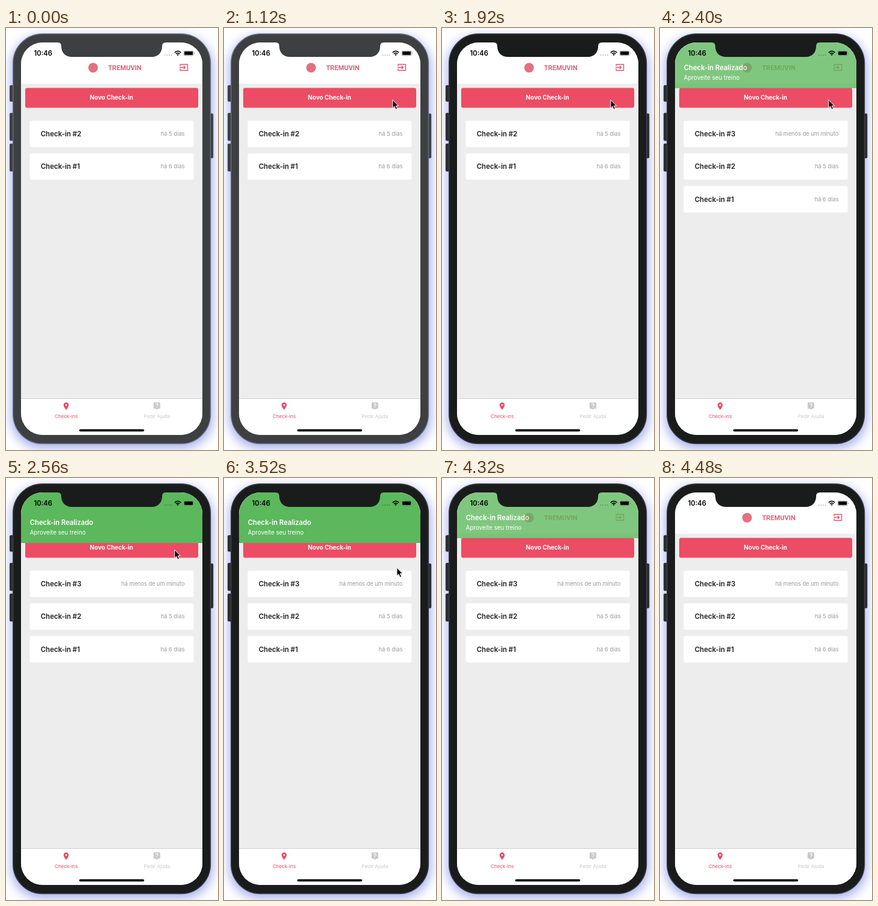
Recreate the animation shown at these times as an HTML page. Size 353 by 701 pixels, loop 5.12 s.

```html
<!DOCTYPE html>
<html lang="pt">
<head>
<meta charset="utf-8">
<title>Check-ins</title>
<style>
  html, body { margin: 0; width: 100%; height: 100%; overflow: hidden; background: #fff; }
  svg { display: block; width: 353px; height: 701px; font-family: Inter, "Open Sans", sans-serif; }
  .bold { font-weight: 700; }
  .semi { font-weight: 600; }
  .mid { text-anchor: middle; }
  .end { text-anchor: end; }
  .red { fill: #ec4c64; }
  .card rect { fill: #fff; }
  .card .bold { font-size: 11.4px; fill: #333; }
  .card .end { font-size: 9.3px; fill: #999; }
  .tab { font-size: 8.1px; text-anchor: middle; }
</style>
</head>
<body>
<svg viewBox="0 0 353 701">
  <defs>
    <filter id="blur" x="-20%" y="-10%" width="140%" height="120%"><feGaussianBlur stdDeviation="9"/></filter>
    <clipPath id="screen"><rect x="25" y="24" width="302" height="652" rx="36"/></clipPath>
  </defs>

  <rect x="9" y="14" width="335" height="684" rx="50" fill="#8c9ae6" opacity=".8" filter="url(#blur)"/>

  <g id="shell">
    <g id="buttons" stroke-width=".8">
      <rect x="6.4" y="95.4" width="8" height="26.5" rx="1.5"/>
      <rect x="6.4" y="141.4" width="8" height="45.5" rx="1.5"/>
      <rect x="6.4" y="192.4" width="8" height="45.5" rx="1.5"/>
      <rect x="337" y="142.4" width="7.8" height="73.5" rx="1.5"/>
    </g>
    <rect id="bezel" x="11.7" y="9.7" width="328.8" height="680.8" rx="49" stroke-width="1.4"/>
  </g>

  <g clip-path="url(#screen)">
    <rect x="25" y="24" width="302" height="652" fill="#ededed"/>
    <rect x="25" y="24" width="302" height="68.5" fill="#fff"/>
    <circle cx="145" cy="66" r="8" fill="#e4707f"/>
    <text x="170" y="70" class="bold" font-size="11.1" fill="#dc6275" style="font-family:Roboto,sans-serif">TREMUVIN</text>
    <g fill="none" stroke="#ec4c64" stroke-width="1.3">
      <path d="M290 63.5V60.5H302.5V70.5H290V67.5M289 65.5H298M295.8 63L298.3 65.5L295.8 68"/>
    </g>

    <rect x="32" y="99.5" width="288" height="33" rx="3" class="red"/>
    <text x="175.7" y="119.4" class="bold mid" font-size="10" fill="#fff">Novo Check-in</text>
    <g id="cards"></g>

    <rect x="25" y="615" width="302" height="61" fill="#fff"/>
    <rect x="25" y="615" width="302" height=".8" fill="#c4c4c4"/>
    <path class="red" fill-rule="evenodd" transform="translate(92.8 620.7) scale(.61)"
      d="M12 2C8.1 2 5 5.1 5 9c0 5.3 7 13 7 13s7-7.700 7-13c0-3.900-3.100-7-7-7zM12 6.500a2.500 2.500 0 0 1 0 5a2.500 2.500 0 0 1 0-5z"/>
    <path fill="#c8c8c8" d="M247.2 622H255.300Q256.700 622 256.700 623.400V631Q256.700 632.400 255.300 632.400H253L251.200 634.300L249.400 632.400H247.200Q245.800 632.400 245.800 631V623.400Q245.800 622 247.200 622Z"/>
    <path d="M249.300 625.800C249.300 623.200 253.200 623.200 253.200 625.700C253.200 627 251.300 627.200 251.300 628.800M251.300 629.800V631" fill="none" stroke="#fff" stroke-width="1.100"/>
    <text x="100.400" y="647.500" class="tab red">Check-ins</text>
    <text x="251.300" y="647.500" class="tab" fill="#c8c8c8">Pedir Ajuda</text>
    <rect x="122" y="666.500" width="108" height="3.700" rx="1.850"/>

    <g id="toast">
      <rect x="25" y="10" width="302" height="98" fill="#5cb85c"/>
      <text x="39.700" y="77.500" class="semi" font-size="11.300" fill="#fff">Check-in Realizado</text>
      <text x="39.700" y="94" font-size="9.800" fill="#fff">Aproveite seu treino</text>
    </g>

    <path id="notch" d="M86 23V24Q92 24 92 30C92 41 99 48 110 48H242C253 48 260 41 260 30Q260 24 266 24V23Z"/>
    <text x="46.500" y="46" class="semi" font-size="11.300">10:46</text>
    <g fill="#000" fill-opacity=".25">
      <circle cx="264.500" cy="45" r="1.100"/><circle cx="268.200" cy="45" r="1.100"/>
      <circle cx="271.900" cy="45" r="1.100"/><circle cx="275.600" cy="45" r="1.100"/>
    </g>
    <g fill="none" stroke="#000" stroke-width="1.600">
      <path d="M280.700 40.800Q286 36.100 291.300 40.800M282.700 43Q286 40.200 289.300 43"/>
      <path d="M284.200 44.200Q286 42.900 287.800 44.200L286 46Z" fill="#000" stroke="none"/>
    </g>
    <rect x="295.900" y="38" width="16.200" height="7.900" rx="2.200" fill="none" stroke="#777" stroke-width=".7"/>
    <rect x="297" y="39.100" width="14" height="5.700" rx="1.200"/>
    <path d="M313 40.500Q314.500 42 313 43.500Z" fill="#777"/>
  </g>

  <path id="cursor" d="M0 0V13.600L3 10.800L5.300 16L7.800 14.900L5.500 9.900H9.800Z" fill="#0b0b14" stroke="#fff" stroke-width="1" stroke-linejoin="round"/>
</svg>
<script>
  const LOOP = 5120;
  const el = id => document.getElementById(id);

  // Each entry holds from its start time until the next one.
  const cursorPath = [
    [0, null], [480, [312, 230]], [640, [300.5, 186.800]], [800, [284.500, 127.500]],
    [960, [282.500, 122.500]], [1120, [280.700, 119.300]], [3520, [287.800, 149]],
    [3680, [308.500, 247]], [3840, null]
  ];
  const toastStates = [
    [0, null], [2400, { y: -8, opacity: .78 }], [2560, { y: 0, opacity: 1 }],
    [4320, { y: -8, opacity: .78 }], [4480, null]
  ];
  const shellColors = [
    [0, { fill: '#3e3f40', edge: '#68708f', button: '#3b3d40' }],
    [1920, { fill: '#1a1c1c', edge: '#3c404c', button: '#2b2e32' }]
  ];
  const cardLists = [
    [0, [[2, 'há 5 dias'], [1, 'há 6 dias']]],
    [2400, [[3, 'há menos de um minuto'], [2, 'há 5 dias'], [1, 'há 6 dias']]]
  ];

  const valueAt = (track, time) => track.findLast(([start]) => start <= time)[1];

  const card = ([number, age], index) => `
    <g class="card" transform="translate(0 ${index * 54.300})">
      <rect x="39.500" y="154" width="273" height="43.800" rx="3"/>
      <text x="57.700" y="180" class="bold">Check-in #${number}</text>
      <text x="297.300" y="179" class="end">${age}</text>
    </g>`;

  function place(node, state) {
    node.style.display = state ? '' : 'none';
    if (state) node.setAttribute('transform', `translate(${state})`);
  }

  let shownCards;
  function render(time) {
    place(el('cursor'), valueAt(cursorPath, time));

    const toast = valueAt(toastStates, time);
    place(el('toast'), toast && [0, toast.y]);
    if (toast) el('toast').setAttribute('opacity', toast.opacity);

    const { fill, edge, button } = valueAt(shellColors, time);
    el('bezel').setAttribute('fill', fill);
    el('bezel').setAttribute('stroke', edge);
    el('buttons').setAttribute('fill', button);
    el('buttons').setAttribute('stroke', fill);
    el('notch').setAttribute('fill', fill);

    const cards = valueAt(cardLists, time);
    if (cards !== shownCards) el('cards').innerHTML = cards.map(card).join('');
    shownCards = cards;
  }

  function tick() {
    render(performance.now() % LOOP);
    requestAnimationFrame(tick);
  }
  tick();
</script>
</body>
</html>
```
